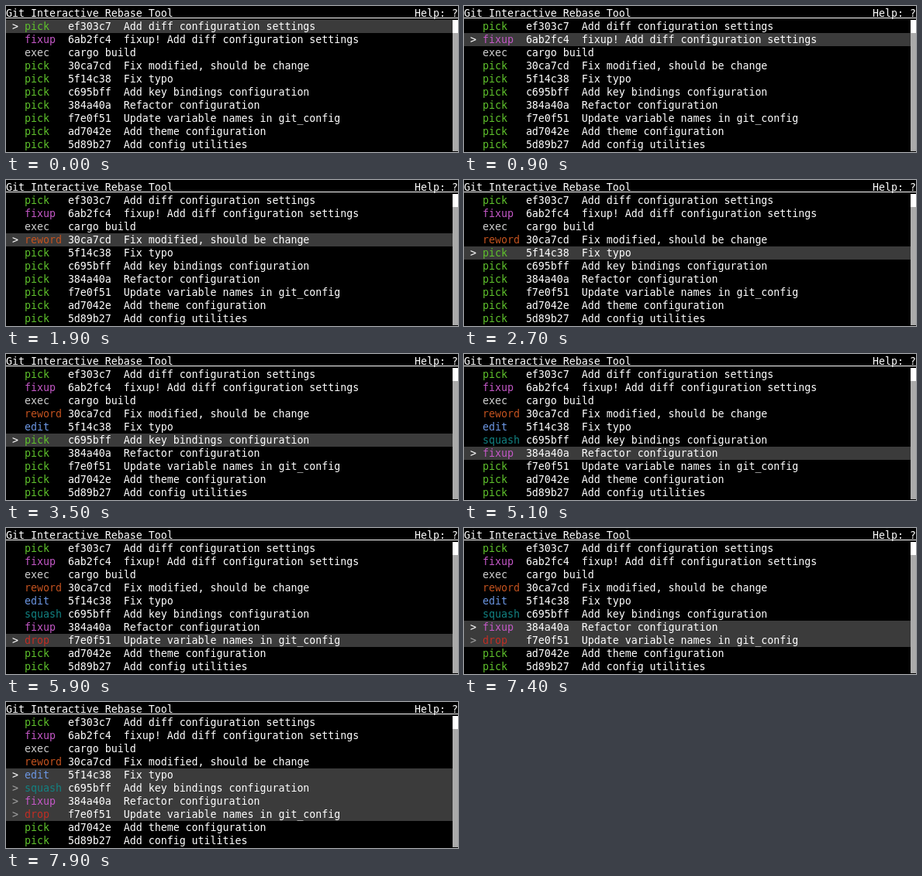
Write an HTML page that moves like this. It is 583 px wide and 189 px high and loops after 8000 ms.

```html
<!DOCTYPE html>
<html lang="en">
<head>
<meta charset="utf-8">
<title>Interactive rebase</title>
<style>
  html, body { margin: 0; width: 100%; height: 100%; overflow: hidden; background: #000; }
  #screen {
    position: relative; width: 583px; height: 189px; overflow: hidden;
    background: #000; color: #fff;
    font: 13.288px/17px "DejaVu Sans Mono", monospace;
    white-space: pre; font-variant-ligatures: none;
  }
  #screen > div { position: absolute; left: 0; height: 17px; }
  #title { top: 1px; width: 584px; }
  #title::after {
    content: ""; position: absolute; left: 0; top: 14px;
    width: 100%; height: 1px; background: #fff;
  }
  .row { width: 576px; }
  .row.on { background: #3b3b3b; }
  .mark { color: #fff; }
  .dim { color: #a0a0a0; }
  .pick { color: #5fc22c; }
  .fixup { color: #c558c8; }
  .exec { color: #d0d0d0; }
  .reword { color: #c5531f; }
  .edit { color: #6c97e4; }
  .squash { color: #128282; }
  .drop { color: #c22e24; }
  #screen > #track { left: 576px; top: 18px; width: 7px; height: 170px; background: #aaa; }
  #thumb { height: 17px; background: #fff; }
</style>
</head>
<body>
<div id="screen">
  <div id="title"></div>
  <div id="track"><div id="thumb"></div></div>
</div>
<script>
const LOOP = 8000;

const todo = [
  ["pick", "ef303c7", "Add diff configuration settings"],
  ["fixup", "6ab2fc4", "fixup! Add diff configuration settings"],
  ["exec", "", "cargo build"],
  ["pick", "30ca7cd", "Fix modified, should be change"],
  ["pick", "5f14c38", "Fix typo"],
  ["pick", "c695bff", "Add key bindings configuration"],
  ["pick", "384a40a", "Refactor configuration"],
  ["pick", "f7e0f51", "Update variable names in git_config"],
  ["pick", "ad7042e", "Add theme configuration"],
  ["pick", "5d89b27", "Add config utilities"]
];

// Key presses: [time in ms, key]
const keys = [
  [600, "down"], [1000, "down"], [1500, "down"], [1800, "reword"],
  [2600, "down"], [2900, "edit"],
  [3400, "down"], [3800, "squash"],
  [4200, "down"], [5000, "fixup"],
  [5300, "down"], [5800, "drop"],
  [6600, "visual"], [7400, "up"], [7700, "up"], [7900, "up"]
];

const screen = document.getElementById("screen");
document.getElementById("title").textContent =
  "Git Interactive Rebase Tool".padEnd(66) + "Help: ?";

function span(parent) {
  return parent.appendChild(document.createElement("span"));
}

const rows = todo.map(([, hash, subject], i) => {
  const el = document.createElement("div");
  el.style.top = 18 + 17 * i + "px";
  const mark = span(el), action = span(el);
  span(el).textContent = hash ? hash.padEnd(9) + subject : subject;
  screen.append(el);
  return { el, mark, action };
});

function replay(count) {
  const actions = todo.map(line => line[0]);
  let cursor = 0, anchor = null;
  for (const [, key] of keys.slice(0, count)) {
    if (key === "down") cursor++;
    else if (key === "up") cursor--;
    else if (key === "visual") anchor = cursor;
    else actions[cursor] = key;
  }
  return { actions, cursor, anchor: anchor ?? cursor };
}

function render({ actions, cursor, anchor }) {
  const first = Math.min(cursor, anchor), last = Math.max(cursor, anchor);
  rows.forEach(({ el, mark, action }, i) => {
    const on = i >= first && i <= last;
    el.className = on ? "row on" : "row";
    mark.className = i === cursor ? "mark" : "dim";
    mark.textContent = on ? " > " : "   ";
    action.className = actions[i];
    action.textContent = actions[i].padEnd(7);
  });
}

let shown = -1;
function tick() {
  const t = performance.now() % LOOP;
  const count = keys.filter(([at]) => at <= t).length;
  if (count !== shown) render(replay(shown = count));
  requestAnimationFrame(tick);
}
tick();
</script>
</body>
</html>
```
